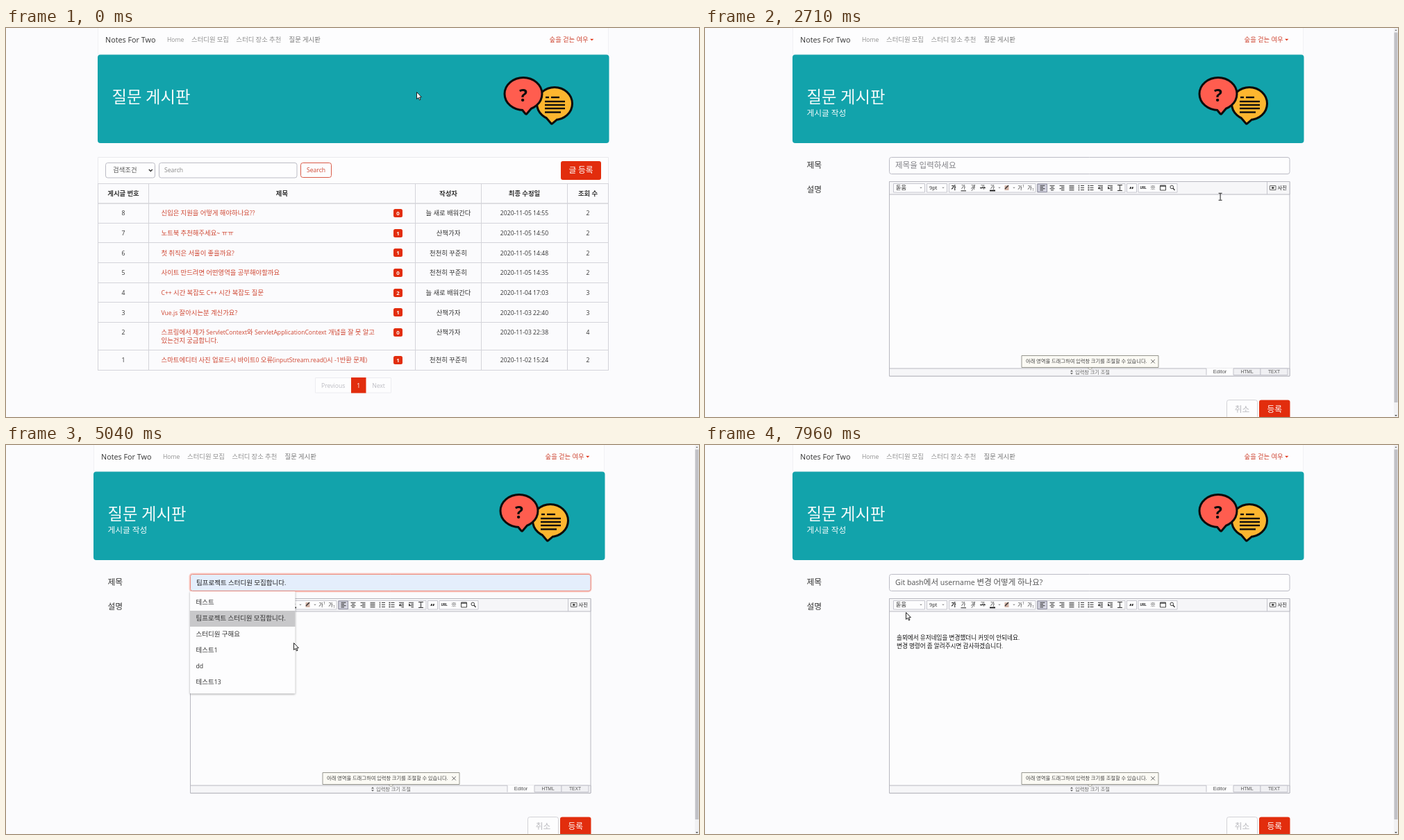
An HTML page with a canvas that plays this animation: 998 px wide and 561 px high, repeating every 8000 ms.

```html
<!DOCTYPE html>
<html lang="ko">
<head>
<meta charset="utf-8">
<title>질문 게시판</title>
<style>
  html, body { margin: 0; width: 100%; height: 100%; overflow: hidden; background: #fbfbfd; }
  canvas { display: block; width: 998px; height: 561px; }
</style>
</head>
<body>
<canvas id="stage" width="998" height="561"></canvas>
<script>
const ctx = document.getElementById('stage').getContext('2d');
const LOOP = 8000;
const BASE = 8.64, LARGE = 10.8;
const PAGE = '#fbfbfd', RED = '#e22d0d', LINK = '#cf4632', TEAL = '#12a3ab', INK = '#333', LINE = '#d4d4da', FIELD = '#bcbcc5';
const LATIN = '"Open Sans", sans-serif';
const HANGUL = '"Noto Sans CJK KR", "Noto Sans CJK", sans-serif';
const EM = 1 / 0.92; // makes one Hangul syllable one em wide

// When things happen, in ms
const AT = { link: 1720, form: 1960, linkEnd: 2400, editor: 2580, focus: 4450, list: 4500,
  pick: 4760, type: 5200, typed: 6000, blur: 6350, body: 6900, bodyEnd: 7550 };

const POSTS = [
  ['8', ['신입은 지원을 어떻게 해야하나요??'], 0, '늘 새로 배워간다', '2020-11-05 14:55', 2],
  ['7', ['노트북 추천해주세요~ ㅠㅠ'], 1, '산책가자', '2020-11-05 14:50', 2],
  ['6', ['첫 취직은 서울이 좋을까요?'], 1, '천천히 꾸준히', '2020-11-05 14:48', 2],
  ['5', ['사이트 만드려면 어떤영역을 공부해야할까요'], 0, '천천히 꾸준히', '2020-11-05 14:35', 2],
  ['4', ['C++ 시간 복잡도 C++ 시간 복잡도 질문'], 2, '늘 새로 배워간다', '2020-11-04 17:03', 3],
  ['3', ['Vue.js 잘아시는분 계신가요?'], 1, '산책가자', '2020-11-03 22:40', 3],
  ['2', ['스프링에서 제가 ServletContext와 ServletApplicationContext 개념을 잘 못 알고', '있는건지 궁금합니다.'],
    0, '산책가자', '2020-11-03 22:38', 4],
  ['1', ['스마트에디터 사진 업로드시 바이트0 오류(inputStream.read()시 -1반환 문제)'], 1, '천천히 꾸준히', '2020-11-02 15:24', 2]
];
const SUGGESTIONS = ['테스트', '팀프로젝트 스터디원 모집합니다.', '스터디원 구해요', '테스트1', 'dd', '테스트13'];
const TITLE = 'Git bash에서 username 변경 어떻게 하나요?';
const BODY = '\n\n솔뫼에서 유저네임을 변경했더니 커밋이 안되네요.\n변경 명령어 좀 알려주시면 감사하겠습니다.';

// Pointer stops: time, x, y, shape used from there on
const POINTER = [
  [0, 591, 92, 'arrow'], [250, 594, 94, 'arrow'], [850, 790, 205, 'arrow'], [1020, 818, 230, 'beam'],
  [1170, 821, 232, 'beam'], [1500, 820, 226, 'beam'], [1700, 815, 210, 'hand'], [1960, 815, 210, 'beam'],
  [2560, 815, 210, 'beam'], [2900, 640, 290, 'beam'], [3200, 250, 370, 'arrow'], [3560, 72, 402, 'arrow'],
  [3800, 72, 402, 'arrow'], [4250, 290, 215, 'beam'], [4400, 330, 199, 'beam'], [4550, 330, 199, 'beam'],
  [4760, 350, 245, 'arrow'], [5040, 414, 285, 'arrow'], [5250, 432, 312, 'beam'], [6000, 432, 312, 'beam'],
  [6400, 332, 336, 'beam'], [7550, 332, 336, 'beam'], [7800, 295, 256, 'arrow'], [7930, 289, 241, 'arrow'],
  [8000, 289, 241, 'arrow']
];

const progress = (t, a, b) => Math.min(1, Math.max(0, (t - a) / (b - a)));

// y is the optical middle of the line
function text(s, x, y, size = BASE, color = INK, align = 'left', weight = 400, latin = LATIN) {
  const runs = (String(s).match(/[\u3131-\ud7a3]+|[^\u3131-\ud7a3]+/g) || []).map(run => {
    const font = /[\u3131-\ud7a3]/.test(run) ? `${weight} ${size * EM}px ${HANGUL}` : `${weight} ${size}px ${latin}`;
    ctx.font = font;
    return { run, font, width: ctx.measureText(run).width };
  });
  const total = runs.reduce((sum, r) => sum + r.width, 0);
  if (align === 'center') x -= total / 2;
  ctx.fillStyle = color;
  for (const r of runs) {
    ctx.font = r.font;
    ctx.fillText(r.run, x, y + size * 0.36);
    x += r.width;
  }
}

function box(x, y, w, h, fill, stroke, radius = 0) {
  ctx.beginPath();
  ctx.roundRect(x, y, w, h, radius);
  if (fill) { ctx.fillStyle = fill; ctx.fill(); }
  if (stroke) { ctx.strokeStyle = stroke; ctx.lineWidth = 1; ctx.stroke(); }
}

function path(points, color, width = 1, fill) {
  ctx.beginPath();
  points.forEach(([x, y], i) => i ? ctx.lineTo(x, y) : ctx.moveTo(x, y));
  if (fill) { ctx.closePath(); ctx.fillStyle = fill; ctx.fill(); }
  if (color) { ctx.strokeStyle = color; ctx.lineWidth = width; ctx.stroke(); }
}
const hline = (x1, x2, y, color, width) => path([[x1, y], [x2, y]], color, width);
const vline = (x, y1, y2, color, width) => path([[x, y1], [x, y2]], color, width);
const caret = (x, y, w, color) => path([[x - w, y - w / 2], [x + w, y - w / 2], [x, y + w / 2]], null, 0, color);

// The tail runs clockwise like the ellipse, so both fill as one shape
function bubble(x, y, rx, ry, fill, tail) {
  const shape = () => {
    ctx.beginPath();
    ctx.ellipse(x, y, rx, ry, 0, 0, Math.PI * 2);
    ctx.closePath();
    tail.forEach(([px, py], i) => i ? ctx.lineTo(px, py) : ctx.moveTo(px, py));
    ctx.closePath();
  };
  ctx.lineJoin = 'round';
  shape();
  ctx.strokeStyle = '#0c0c0c';
  ctx.lineWidth = 6;
  ctx.stroke();
  shape();
  ctx.fillStyle = fill;
  ctx.fill();
  ctx.lineJoin = 'miter';
}

function header(subtitle) {
  box(132.5, -2, 735, 40, '#fdfdfe', '#f1f1f4');
  text('Notes For Two', 143, 17.5, LARGE);
  text('Home', 232, 17, BASE, '#909090');
  text('스터디원 모집', 267, 17, BASE, '#909090');
  text('스터디 장소 추천', 331.5, 17, BASE, '#909090');
  text('질문 게시판', 407.5, 17, BASE, '#777');
  text('숲을 걷는 여우', 782.5, 17, BASE, LINK);
  caret(843.7, 17, 2.6, RED);

  box(132, 38.5, 736.5, 127.5, TEAL, null, 4);
  text('질문 게시판', 152.5, 100, 21.5, '#f4fbfb', 'left', 300);
  if (subtitle) text(subtitle, 152.5, 123.5, LARGE, '#f4fbfb', 'left', 300);

  bubble(790, 109, 24, 22, '#fdb62f', [[796, 128], [786, 136.5], [777, 126]]);
  bubble(745, 95, 25.5, 22, '#ff5d4f', [[758, 112], [749, 122.5], [742, 114]]);
  text('?', 745, 97, 25, '#0c0c0c', 'center', 700);
  [[777, 782, 100], [785, 797, 100], [776, 805, 106], [776, 805, 111], [776, 805, 116], [776, 799, 121.5]]
    .forEach(([a, b, y]) => hline(a, b, y, '#0c0c0c', 2.4));
}

function button(label, x, y, w, h, size = LARGE) {
  box(x, y, w, h, RED, null, 3);
  text(label, x + w / 2, y + h / 2, size, '#fff', 'center');
}

function listPage() {
  header();
  box(132.5, 186.5, 735, 38, '#fdfdfe', '#e9e9ed');
  box(143.5, 194.5, 71, 21.5, '#fdfdfe', FIELD, 3);
  text('검색조건', 154, 205, BASE, '#555');
  path([[205.8, 204], [208.3, 206.6], [210.8, 204]], '#333', 1.4);
  box(220.5, 194.5, 198.5, 21.5, '#fdfdfe', FIELD, 3);
  text('Search', 228, 205.3, BASE, '#888');
  box(424.5, 194.5, 44, 21, null, '#d95a47', 3);
  text('Search', 446.5, 205, BASE, LINK, 'center');
  button('글 등록', 799, 192, 58, 27);

  const columns = [132.5, 205.5, 589.5, 684.5, 808.5, 867.5];
  const mid = columns.slice(1).map((x, i) => (x + columns[i]) / 2);
  columns.forEach(x => vline(x, 224, 494, LINE));
  hline(132, 868, 224.5, LINE);
  hline(132, 868, 253, LINE, 1.6);
  ['게시글 번호', '제목', '작성자', '최종 수정일', '조회 수']
    .forEach((s, i) => text(s, mid[i], 238.5, BASE, INK, 'center', 700));

  let top = 253;
  for (const [id, title, replies, author, date, views] of POSTS) {
    const y = top + 14.3;
    text(id, mid[0], y, BASE, INK, 'center');
    title.forEach((s, i) => text(s, 223.5, y + i * 11.7, BASE, LINK));
    box(558, Math.round(y - 6.2), 13, 12, RED, null, 2.5);
    text(replies, 564.5, y, 7.8, '#fff', 'center', 700);
    text(author, mid[2], y, BASE, INK, 'center');
    text(date, mid[3], y, BASE, INK, 'center');
    text(views, mid[4], y, BASE, INK, 'center');
    top += 28.65 + (title.length - 1) * 11.5;
    hline(132, 868, Math.round(top) - 0.5, LINE);
  }

  box(445.5, 504.5, 109, 21.5, '#fdfdfe', '#ececf0');
  box(497, 504, 21.5, 22.5, RED);
  text('Previous', 471.2, 515.5, BASE, '#bcbcc2', 'center');
  text('1', 507.7, 515.5, BASE, '#fff', 'center');
  text('Next', 536.5, 515.5, BASE, '#bcbcc2', 'center');
}

function titleField(t) {
  const focused = t >= AT.focus && t < AT.blur;
  const preview = t >= AT.pick && t < AT.type;
  if (focused) box(269.5, 184.5, 580, 28, '#f9cfc9', null, 5);
  box(271.5, 186.5, 576.5, 24, preview ? '#e4eefc' : '#fdfdfe', focused ? '#ee8a7c' : FIELD, 3);
  if (preview) text(SUGGESTIONS[1], 280, 198.5, BASE + 0.1, '#222');
  else if (t < AT.type) text('제목을 입력하세요', 280, 198.5, 10.6, '#808086');
  else text(TITLE.slice(0, Math.ceil(TITLE.length * progress(t, AT.type, AT.typed))), 280, 198.5, 10.6, '#555');
}

function formPage(t) {
  const editor = t >= AT.editor;
  ctx.save();
  if (editor) ctx.translate(-6, 0); // room taken by the scrollbar
  header('게시글 작성');
  text('제목', 152.5, 198.5, LARGE);
  text('설명', 152.5, 233, LARGE);
  titleField(t);
  if (!editor) {
    box(271.5, 221, 576.5, 250, '#fdfdfe', FIELD, 3);
    text('내용을 입력하세요', 280, 231, BASE, '#808086');
    [3, 6].forEach(d => path([[847 - d, 469.5], [847, 469.5 - d]], '#666', 0.8));
  }
  const y = editor ? 536.5 : 516.5;
  box(757.5, y, 44, 27, '#fdfdfe', '#d2d2d6', 3);
  text('취소', 779.5, y + 13.5, LARGE, '#b9b9be', 'center');
  button('등록', 804, y, 44.5, 27);
  ctx.restore();
  if (!editor) return;

  editorBox(t);
  if (t >= AT.list && t < AT.type) suggestions(t);
  box(992, 0, 6, 561, '#f1f1f3');
  box(992.5, 6.5, 5, 533.5, '#c1c1c6');
  path([[993.5, 4], [995, 2], [996.5, 4]], null, 0, '#777');
  caret(995, 559, 1.8, '#444');
}

// Four text lines: the odd ones have width w, pushed right by shift
function alignIcon(x, w, shift = 0) {
  for (let i = 0; i < 4; i++) {
    const width = i % 2 ? w : 7;
    const left = x - 3.5 + shift * (7 - width);
    hline(left, left + width, 227.3 + i * 2.2, '#333');
  }
}

function toolbar() {
  const y = 230.5, edge = '#c6c6ce';
  box(265.5, 221.5, 576.5, 18.5, '#f6f6f8', '#b8b8c0');
  [[271.5, 45], [319.5, 29], [351.5, 124.5], [478.5, 126.5], [607.5, 14], [624, 56]]
    .forEach(([x, w]) => box(x, 224.5, w, 12.5, '#fdfdfe', edge));
  text('돋움', 275, y, 7.4, '#222');
  text('9pt', 323, y, 7.4, '#222');
  caret(311, y, 1.7, '#777');
  caret(343, y, 1.7, '#777');

  text('가', 358, y, 7, '#111', 'center', 700);
  [372, 386, 400, 414].forEach(x => text('가', x, y - 0.4, 6.6, '#222', 'center'));
  hline(368.5, 376, 234.8, '#222');
  path([[384, 235], [389, 226]], '#555', 0.8);
  hline(396, 404, y, '#222');
  hline(410, 418, 234.5, '#111', 1.8);
  box(431.5, 227, 6, 7, '#d3b3a6');
  path([[432, 232], [437, 227]], '#333', 1.5);
  caret(424, y, 1.7, '#777');
  caret(445, y, 1.7, '#777');
  [[453.5, -2], [467.5, 2.5]].forEach(([x, dy]) => {
    text('가', x, y, 6.4, '#222', 'center');
    text('1', x + 5, y + dy, 4.5, '#222', 'center');
  });

  box(479, 225, 13.5, 11.5, '#d4d4e0', '#8f8fa0');
  alignIcon(486, 4.5);
  alignIcon(500, 4, 0.5);
  alignIcon(514, 4.5, 1);
  alignIcon(528, 7);
  [542, 555.5].forEach((x, i) => {
    for (let k = -1; k < 2; k++) {
      hline(x - 1, x + 4, y + k * 3, '#333');
      hline(x - 4, x - (i ? 2.2 : 3), y + k * 3, '#222', i ? 1.6 : 2);
    }
  });
  [569.5, 583.5].forEach((x, i) => {
    alignIcon(x, 3.5, 1);
    path([[x - 3.5 + i * 2.5, y], [x - 1 - i * 2.5, y - 2], [x - 1 - i * 2.5, y + 2]], null, 0, '#333');
  });
  hline(594, 601, 226.5, '#333');
  hline(594, 601, 234.5, '#333');
  vline(597.5, 226.5, 234.5, '#333');
  text('“', 614.2, y + 3, 13, '#222', 'center', 700);
  text('URL', 631, y, 4.6, '#222', 'center', 700);
  text('※', 645, y, 8, '#222', 'center', 700, HANGUL);
  box(655.5, 227, 8, 7, '#fff', '#444');
  hline(655.5, 663.5, 228, '#444', 1.5);
  ctx.beginPath();
  ctx.arc(672.3, 229.4, 2.3, 0, Math.PI * 2);
  ctx.strokeStyle = '#333';
  ctx.lineWidth = 1;
  ctx.stroke();
  path([[674, 231], [676.5, 234]], '#333', 1.3);

  vline(809.5, 222, 240, edge);
  box(813.5, 227.5, 8.5, 6, '#fff', '#666');
  box(816, 229, 3.5, 3, '#555');
  text('사진', 824.5, y, 6.8, '#222');
}

function editorBox(t) {
  box(265.5, 221.5, 576.5, 280.5, '#fcfcfd', '#b8b8c0');
  toolbar();
  const shown = BODY.slice(0, Math.ceil(BODY.length * progress(t, AT.body, AT.bodyEnd)));
  shown.split('\n').forEach((s, i) => text(s, 276, 254.8 + i * 11.7, 7.95, '#111'));

  box(265.5, 491, 576.5, 11, '#f6f6f8', '#b8b8c0');
  path([[526, 495.5], [528, 493.3], [530, 495.5]], null, 0, '#555');
  caret(528, 498.6, 2, '#555');
  text('입력창 크기 조절', 533, 497, 6.65, '#666');
  ['Editor', 'HTML', 'TEXT'].forEach((s, i) => {
    const x = 722 + i * 39;
    box(x, i ? 491 : 490.4, 39, i ? 9.5 : 10.2, i ? '#f0f0f3' : '#fdfdfe', i ? '#c3c3cc' : null);
    text(s, x + 19.5, 495.5, i ? 6.7 : 7.5, '#555', 'center', 400, '"Liberation Sans", sans-serif');
  });
  vline(722, 491, 500.5, '#c3c3cc');

  box(456, 472.5, 197, 17, '#fbfaf4', '#96968f');
  path([[550.5, 489.5], [554.5, 492.5], [558.5, 489.5]], '#96968f', 1, '#fbfaf4');
  text('아래 영역을 드래그하여 입력창 크기를 조절할 수 있습니다.', 462, 481, 6.7, '#444');
  path([[642.3, 478], [647.8, 483.5]], '#666');
  path([[647.8, 478], [642.3, 483.5]], '#666');
}

function suggestions(t) {
  ctx.save();
  ctx.shadowColor = 'rgba(0,0,0,.35)';
  ctx.shadowBlur = 3;
  ctx.shadowOffsetY = 1;
  box(265, 211, 151.5, 147.5, '#fdfdfe', null, 1);
  ctx.restore();
  if (t >= AT.pick) box(265, 239, 151.5, 23, '#c8c8ca');
  SUGGESTIONS.forEach((s, i) => text(s, 273.5, 227.3 + i * 23, BASE + 0.1, '#333'));
}

function statusBar() {
  box(-3, 553, 334, 12, '#6c6c6f', null, 2);
  text('ec2-15-164-33-81.ap-northeast-2.compute.amazonaws.com:8080/board/question/posts/', 0.5, 559.3, 7.7, '#f2f2f2');
}

function pointer(t) {
  const i = POINTER.findIndex((p, k) => k === POINTER.length - 2 || t < POINTER[k + 1][0]);
  const [t0, x0, y0, shape] = POINTER[i], [t1, x1, y1] = POINTER[i + 1];
  const p = progress(t, t0, t1), k = p * p * (3 - 2 * p);
  ctx.save();
  ctx.translate(x0 + (x1 - x0) * k, y0 + (y1 - y0) * k);
  if (shape === 'arrow') {
    path([[0.5, 0.5], [0.5, 10.5], [2.9, 8.4], [4.4, 11.9], [6, 11.2], [4.5, 7.9], [7.4, 7.7], [0.5, 0.5]], '#222', 1, '#fff');
  } else if (shape === 'beam') {
    vline(0, -4.5, 4.5, '#333', 1.1);
    [-5, 5].forEach(y => hline(-2.5, 2.5, y, '#333', 1.1));
  } else {
    path([[0, 0], [1.6, 0], [1.8, 4.5], [7, 5.6], [6.6, 9.5], [5.4, 12], [0.5, 12], [-3, 7], [-2, 6], [0, 7.5]], '#222', 1, '#fff');
  }
  ctx.restore();
}

function draw(t) {
  box(0, 0, 998, 561, PAGE);
  if (t < AT.form) listPage(); else formPage(t);
  if (t >= AT.link && t < AT.linkEnd) statusBar();
  pointer(t);
}

const start = performance.now();
function tick() {
  draw((performance.now() - start) % LOOP);
  requestAnimationFrame(tick);
}
tick();
</script>
</body>
</html>
```
